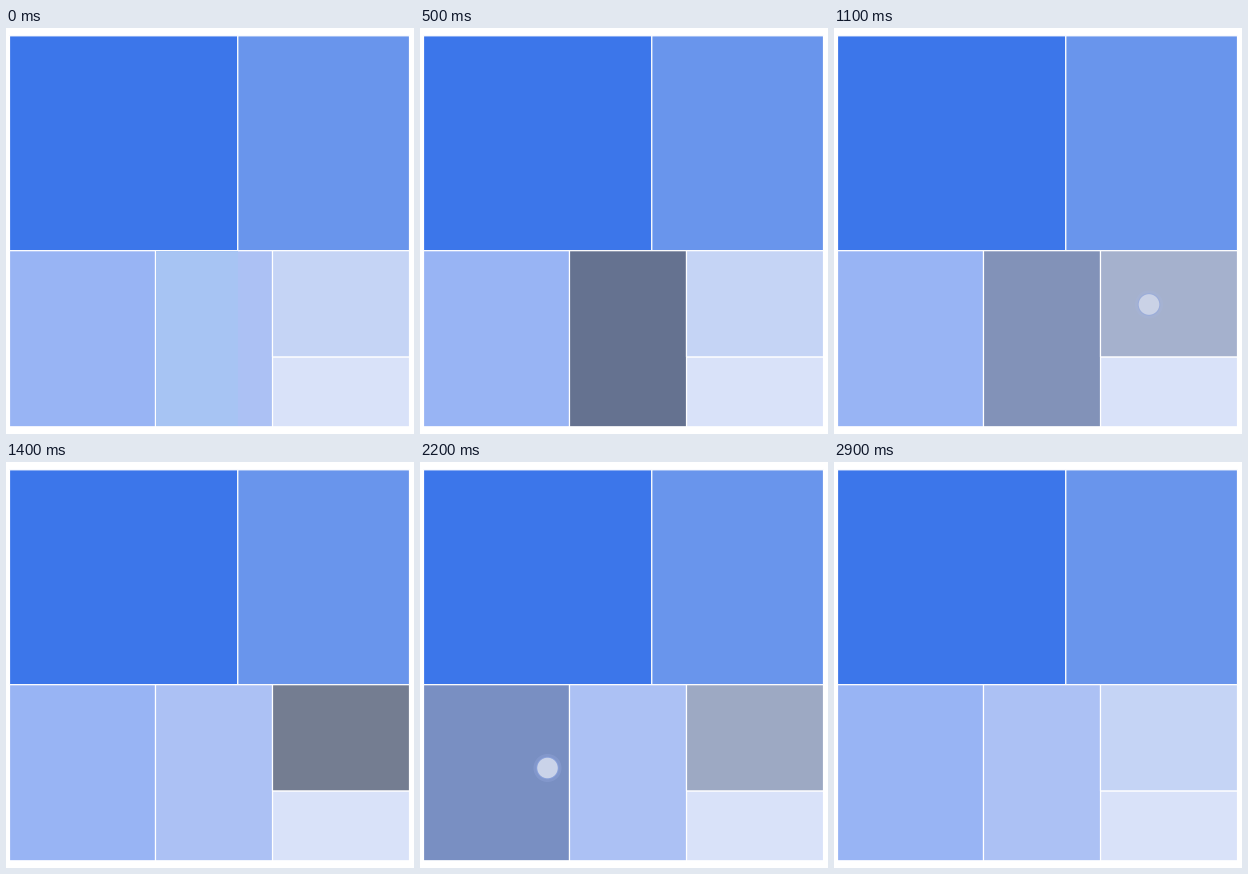
Animation of 408 by 406 pixels, one loop 3000 ms. Source, as a matplotlib script:

```python
import numpy as np
import matplotlib.pyplot as plt
from matplotlib.animation import FuncAnimation
from matplotlib.colors import to_rgb
from matplotlib.patches import Circle, Rectangle

W, H, DPI = 408, 406, 64
FRAMES, STEP = 30, 100
PX = 72 / DPI
SHADE = 0.59

fig = plt.figure(figsize=(W / DPI, H / DPI), dpi=DPI, facecolor="white")
ax = fig.add_axes([0, 0, 1, 1])
ax.set_xlim(0, W)
ax.set_ylim(H, 0)
ax.axis("off")


def ramp(t, start, end):
    return np.clip((t - start) / (end - start), 0, 1)


def tile(left, top, right, bottom, colour):
    """A tile with a white border, half of it inside the tile."""
    return ax.add_patch(Rectangle((left, top), right - left, bottom - top,
                                  facecolor=colour, edgecolor="white",
                                  linewidth=1.2 * PX, snap=False))


# Cuts of the treemap
LEFT, TOP, RIGHT, BOTTOM = 3.5, 7.8, 403.5, 398.8
ROW, SPLIT, COL_1, COL_2, SUBROW = 222.7, 231.8, 149.5, 266.5, 328.9
COLOURS = {"left": "#98b4f4", "middle": "#acc1f4", "right": "#c5d4f5"}

tile(LEFT, TOP, SPLIT, ROW, "#3c76ea")
tile(SPLIT, TOP, RIGHT, ROW, "#6995ec")
tile(COL_2, SUBROW, RIGHT, BOTTOM, "#d9e2f9")
tiles = {
    "left": tile(LEFT, ROW, COL_1, BOTTOM, COLOURS["left"]),
    "middle": tile(COL_1, ROW, COL_2, BOTTOM, COLOURS["middle"]),
    "right": tile(COL_2, ROW, RIGHT, SUBROW, COLOURS["right"]),
}
tint = ax.add_patch(Rectangle((150, 223), 82, 175, color="#a7c4f3", linewidth=0))


class Tap:
    """A touch dot that holds, then fades over the second half of its life."""

    def __init__(self, x, y, start, end):
        self.start, self.end = start, end
        self.layers = [
            (Circle((x, y), 14, color="#a9bcf2", linewidth=0), .2),
            (Circle((x, y), 10.8, fill=False, edgecolor="#8da6e6", linewidth=PX), .6),
            (Circle((x, y), 10.3, color="#e3e8f4", linewidth=0), .75),
        ]
        for patch, _ in self.layers:
            ax.add_patch(patch)

    def show(self, t):
        middle = (self.start + self.end) / 2
        opacity = (t >= self.start) * (1 - ramp(t, middle, self.end))
        for patch, weight in self.layers:
            patch.set_alpha(opacity * weight)


taps = [Tap(315, 276.5, 800, 1300),
        Tap(127.5, 306, 2000, 2800),
        Tap(96.5, 321.5, 2600, 2900)]


def update(frame):
    t = frame * STEP
    # The selection passes from tile to tile; each fade-out is the next fade-in.
    first, second = ramp(t, 100, 500), ramp(t, 900, 1400)
    third, last = ramp(t, 1900, 2500), ramp(t, 2600, 2900)
    selected = {"middle": first - second, "right": second - third,
                "left": third - last}
    for name, amount in selected.items():
        rgb = np.array(to_rgb(COLOURS[name]))
        tiles[name].set_facecolor(rgb * (1 - (1 - SHADE) * amount))
    tint.set_visible(t < 200)
    for tap in taps:
        tap.show(t)
    return []


anim = FuncAnimation(fig, update, frames=FRAMES, interval=STEP,
                     init_func=lambda: update(0), repeat=True, repeat_delay=0)
plt.show()
```
